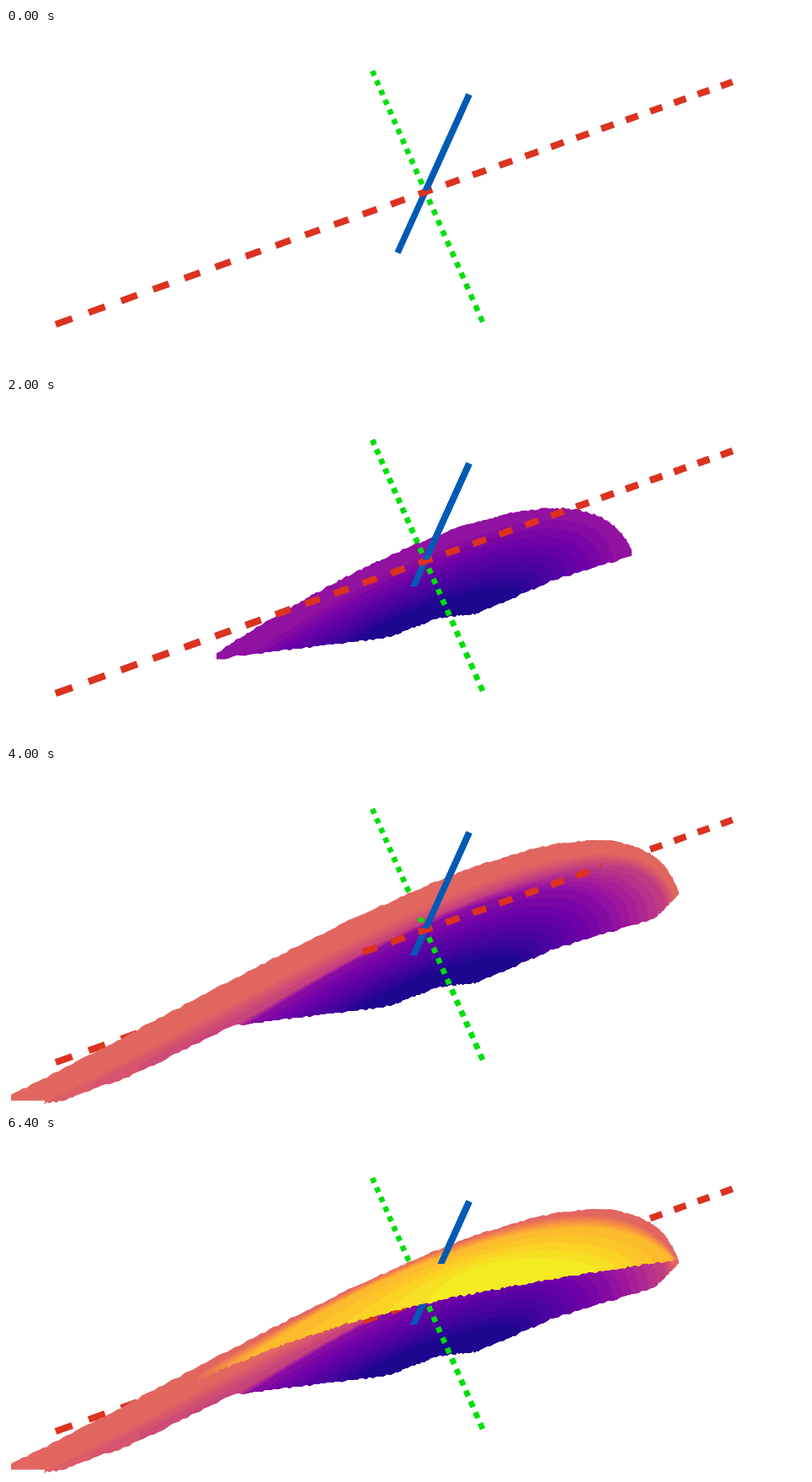
Recreate the animation shown at these times as an HTML page with a canvas. Size 950x405 px, loop 6.6 s.

```html
<!DOCTYPE html>
<html lang="en">
<head>
<meta charset="utf-8">
<title>Layered cloud with axes</title>
<style>
html, body { margin: 0; width: 100%; height: 100%; overflow: hidden; background: #fff; }
canvas { display: block; }
</style>
</head>
<body>
<canvas id="stage" width="950" height="405"></canvas>
<script>
const ctx = document.getElementById('stage').getContext('2d');
const W = 950, H = 405, STEP = 200, COUNT = 33;
const BOWL_TOP = 20, DOME_LEFT = 220;

// Each edge is one cubic Bezier that morphs between a few key layers.
const rim = [
  [4, [341, 294, 430, 232, 650, 146, 655, 208]],
  [10, [250, 304, 415, 195, 690, 56, 743, 182]],
  [16, [80, 372, 336, 242, 735, -15, 788, 163]],
  [18, [6, 391, 316, 237, 738, -34, 799, 150]]
];
const inner = [
  [4, [365, 298, 440, 240, 645, 155, 652, 218]],
  [9, [285, 309, 410, 225, 700, 65, 722, 196]],
  [15, [272, 309, 450, 200, 765, 30, 784, 172]],
  [19, [45, 400, 330, 265, 745, -15, 795, 162]]
];
const domeBack = [
  [20, [220, 288, 400, 183, 710, 3, 798, 148]],
  [28, [290, 262, 430, 165, 690, 50, 790, 145]],
  [32, [500, 199, 530, 150, 620, 135, 700, 155]]
];
const domeSeam = [
  [20, [220, 308, 400, 210, 690, 20, 798, 150]],
  [28, [220, 296, 420, 215, 600, 100, 798, 148]],
  [32, [220, 296, 380, 215, 560, 182, 798, 148]]
];
const keel = [[5, 397], [18, 404], [65, 398], [150, 367], [270, 308], [385, 294],
  [450, 286], [515, 262], [560, 257], [650, 217], [770, 181], [799, 152]];

const plasma = ['0d0887', '46039f', '7201a8', '9c179e', 'bd3786',
  'd8576b', 'ed7953', 'fb9f3a', 'fdca26', 'f0f921']
  .map(hex => [0, 2, 4].map(i => parseInt(hex.slice(i, i + 2), 16)));

const mix = (a, b, f) => a + (b - a) * f;
const mixAll = (a, b, f) => a.map((v, i) => mix(v, b[i], f));

function layerColor(layer) {
  const p = layer / 33 * (plasma.length - 1), i = Math.floor(p);
  return `rgb(${mixAll(plasma[i], plasma[i + 1], p - i).map(Math.round)})`;
}

// Extends the first span backwards and holds the last key.
function morph(keys, layer) {
  const i = Math.max(1, keys.findIndex(([at]) => at >= layer));
  const [a, b] = layer > keys[keys.length - 1][0] ? keys.slice(-2) : [keys[i - 1], keys[i]];
  return mixAll(a[1], b[1], Math.min(1, (layer - a[0]) / (b[0] - a[0])));
}

function noise(a, b) {
  const v = Math.sin(a * 12.9898 + b * 78.233) * 43758.5453;
  return (v - Math.floor(v)) * 2 - 1;
}

function ragged(pointAt, amp, seed, count = 200) {
  return Array.from({ length: count + 1 }, (_, i) => {
    const [x, y] = pointAt(i / count);
    return [x, y + amp * noise(i, seed)];
  });
}

function bezier([x0, y0, x1, y1, x2, y2, x3, y3]) {
  return t => {
    const s = 1 - t, a = s * s * s, b = 3 * s * s * t, c = 3 * s * t * t, d = t * t * t;
    return [a * x0 + b * x1 + c * x2 + d * x3, a * y0 + b * y1 + c * y2 + d * y3];
  };
}

function polyline(points) {
  return t => {
    const p = t * (points.length - 1), i = Math.min(Math.floor(p), points.length - 2);
    return mixAll(points[i], points[i + 1], p - i);
  };
}

function trace(points) {
  ctx.beginPath();
  points.forEach(([x, y]) => ctx.lineTo(x, y));
  ctx.closePath();
}

function clipped(points, paint) {
  ctx.save();
  trace(points);
  ctx.clip();
  paint();
  ctx.restore();
}

const clipBox = (x0, y0, x1, y1, paint) =>
  clipped([[x0, y0], [x1, y0], [x1, y1], [x0, y1]], paint);

// Fills everything below an edge, with a blunt left tip.
function shell(keys, layer, amp) {
  const edge = ragged(bezier(morph(keys, layer)), amp, layer);
  const [x, y] = edge[0], right = edge[edge.length - 1][0];
  trace([...edge, [right, H], [x + 40, H], [x + 40, y + 7], [x, y + 7]]);
  ctx.fillStyle = layerColor(layer);
  ctx.fill();
}

function drawBowl(top) {
  const lower = ragged(polyline(keel), 1.2, 5, 264);
  clipped([[0, 0], ...lower, [W, 0]], () => {
    shell(rim, top, 1.2);
    for (let layer = top - 1; layer > 0; layer--) shell(inner, layer, 0.8);
  });
}

function drawDome(top) {
  const seam = ragged(bezier(morph(domeSeam, top)), top < 30 ? 2.6 : 1.5, top);
  clipped([[DOME_LEFT, 0], ...seam, [W, 0]], () => {
    for (let layer = BOWL_TOP + 1; layer <= top; layer++) shell(domeBack, layer, 0.9);
  });
  blueAxis(0, Math.min(158, 185 - top));
}

function segment([x1, y1], [x2, y2], color, width) {
  ctx.strokeStyle = color;
  ctx.lineWidth = width;
  ctx.beginPath();
  ctx.moveTo(x1, y1);
  ctx.lineTo(x2, y2);
  ctx.stroke();
}

// Dashes spaced in perspective.
function dashes(pointAt, color, width) {
  for (let u = 0; u < 25; u++) segment(pointAt(u), pointAt(u + 0.5), color, width);
}

function redAxis(from = 0, to = W) {
  const pointAt = u => {
    const run = 39.5 * u / (1 + u / 120);
    return [59 + run, 352 - run * 0.3583];
  };
  clipBox(from, 0, to, H, () => dashes(pointAt, '#dc3220', 8));
}

function greenAxis(from = 0) {
  const pointAt = u => {
    const drop = 11.3 * u / (1 - 0.0029 * u);
    return [435 + drop * 0.4396, 51 + drop];
  };
  clipBox(0, from, W, H, () => dashes(pointAt, '#00df0a', 6.5));
}

function blueAxis(from = 0, to = H) {
  clipBox(0, from, W, to, () => segment([550, 79], [465, 267], '#005ab5', 7.5));
}

// The parts of the axes in front of the bowl wall.
function drawFrontAxes(top) {
  const open = top < 13;
  greenAxis(open ? 0 : Math.min(180, 165 + (top - 13) * 5));
  blueAxis(190, 225);
  redAxis(open ? 0 : Math.min(412, 300 + (top - 13) * 40), open ? W : 708);
  blueAxis(0, 193);
}

function draw(top) {
  ctx.fillStyle = '#fff';
  ctx.fillRect(0, 0, W, H);
  greenAxis();
  blueAxis();
  redAxis();
  blueAxis(0, 193);
  if (top === 0) return;
  drawBowl(Math.min(top, BOWL_TOP));
  drawFrontAxes(top);
  if (top > BOWL_TOP) drawDome(top);
}

let shown = -1;
const start = performance.now();
function tick() {
  const top = Math.floor((performance.now() - start) / STEP) % COUNT;
  if (top !== shown) draw(shown = top);
  requestAnimationFrame(tick);
}
tick();
</script>
</body>
</html>
```
